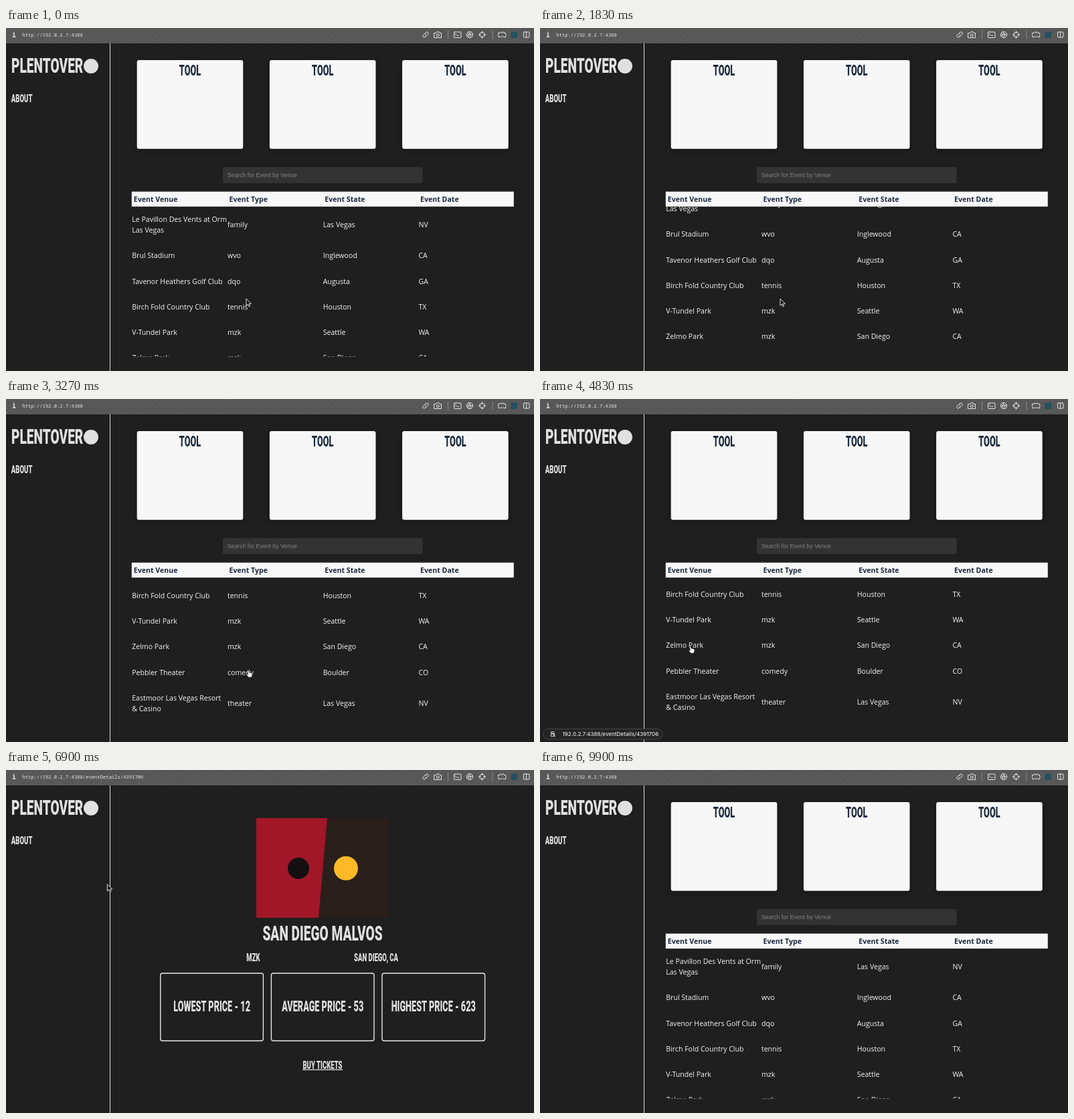
These frames come from a looping animation (789x513 px, 9.93 s). An HTML page:

```html
<!DOCTYPE html>
<html lang="en">
<head>
<meta charset="utf-8">
<title>Event list</title>
<style>
  html, body { margin: 0; width: 100%; height: 100%; overflow: hidden; background: #1f1f1f; }
  svg { display: block; width: 789px; height: 513px; }
  .line { fill: none; stroke: #e6e6e6; stroke-width: 1; stroke-linecap: round; stroke-linejoin: round; }
  .mono { font: 7.2px "Noto Sans Mono", monospace; fill: #e2e2e2; }
  .body { font: 500 10.6px "Open Sans", sans-serif; fill: #f4f4f4; }
  .head { font: 700 10.6px "Open Sans", sans-serif; fill: #1b263b; }
  .hint { font: 8.75px "Liberation Sans", Arial, sans-serif; fill: #828282; }
  .note { font: 500 8px Inter, sans-serif; fill: #e2e2e2; }
  .title { font-family: Roboto, sans-serif; font-weight: 900; fill: #e0e0e0; }
  .card { fill: #f7f7f7; filter: drop-shadow(0 2px 4px rgba(0, 0, 0, .35)); }
</style>
</head>
<body>
<svg viewBox="0 0 789 513">
  <defs>
    <pattern id="hatch" width="6" height="6" patternUnits="userSpaceOnUse" patternTransform="rotate(45)">
      <rect width="6" height="6" fill="#5a5a5a"/>
      <rect width="3" height="6" fill="#565656"/>
    </pattern>
    <clipPath id="listArea"><rect x="180" y="266" width="590" height="225.5"/></clipPath>
  </defs>
  <rect width="789" height="513" fill="#1f1f1f"/>

  <g id="home">
    <g id="cards"></g>
    <rect x="324" y="208" width="298.5" height="24" rx="2" fill="#333"/>
    <text class="hint" x="330.7" y="223">Search for Event by Venue</text>
    <g clip-path="url(#listArea)"><g id="rows" class="body"></g></g>
    <rect x="187.8" y="244.7" width="571" height="22.4" fill="#f8f8f8"/>
    <g id="heads" class="head"></g>
  </g>

  <g id="details">
    <rect x="374" y="72" width="198.5" height="149" fill="#2a1f1b"/>
    <path d="M374 72H480L467 221H374Z" fill="#a11727"/>
    <circle cx="437" cy="147" r="16" fill="#150f11"/>
    <circle cx="508" cy="147" r="18" fill="#fdb927"/>
    <g id="facts"></g>
    <path d="M443 448.3H503" stroke="#e0e0e0" stroke-width="1.2"/>
  </g>

  <g id="side"></g>
  <circle cx="127" cy="57" r="11" fill="#e0e0e0"/>
  <path d="M155.5 23V513" stroke="#dedede"/>

  <rect width="789" height="23" fill="url(#hatch)"/>
  <g class="line">
    <path d="M10.7 8.7H12.2V12.8M10.3 13H14" stroke-width="1.3"/>
    <path d="M12 6.6h.1" stroke-width="1.7"/>
    <path d="M626 8.2l1.6-1.6a2 2 0 0 1 3 3l-1.8 1.8a2 2 0 0 1-2.8 0M628 11.8l-1.6 1.6a2 2 0 0 1-3-3l1.8-1.8a2 2 0 0 1 2.8 0"/>
    <path d="M640 7.5h2.5l1-1.7h3.5l1 1.7h2.5v7h-10.5z"/>
    <circle cx="645.2" cy="10.7" r="1.9"/>
    <path d="M660.5 4V16M727 4V16" stroke="#888"/>
    <rect x="669.5" y="6" width="10.5" height="8.5" rx="1"/>
    <path d="M671.5 8.5l1.5 1.3-1.5 1.3M674.5 11.3h2"/>
    <circle cx="693" cy="10" r="4.6"/>
    <path d="M691 6l4.5 4.5M697.5 9l-6 2M694.5 14l-1.5-7M689 12l4.5-4.5M690 8l2 6" stroke-width=".8"/>
    <circle cx="711.5" cy="10" r="3.8"/>
    <path d="M711.5 4.8v3M711.5 12.2v3M706.3 10h3M713.7 10h3"/>
    <path d="M735.5 7.5h2.500a1.5 1.5 0 0 1 3 0h.500a1.5 1.5 0 0 1 3 0h2v1.500a1.5 1.5 0 0 1 0 2.500v2h-2.500a1.5 1.5 0 0 0-2.500 0h-.500a1.5 1.5 0 0 0-2.500 0h-2.500v-2a1.5 1.5 0 0 1 0-2.500z"/>
    <rect x="773.5" y="6" width="8.5" height="8" rx="1"/>
    <path d="M777.7 6v8"/>
  </g>
  <rect x="754.5" y="5.500" width="9.500" height="9.500" rx="1" fill="#24505f"/>
  <text id="url" class="mono" x="24.3" y="12.6"></text>

  <g id="status">
    <rect id="pill" x="4.5" y="493.5" height="15.5" rx="7.7" fill="#242424" stroke="#474747"/>
    <path class="line" stroke-width=".9" d="M17.5 500.5v-1.5a1.7 1.7 0 0 1 3.4 0v1.5M16.7 500.7h5v3.6h-5zM16 497.5l6.5 7.3"/>
    <text id="link" class="note" x="33.5" y="504"></text>
  </g>

  <g id="cursor">
    <path id="arrow" d="M0 0V10.2L2.4 8 4 11.7 5.7 11 4.1 7.4H7.3Z" fill="#111" stroke="#f4f4f4" stroke-width=".9"/>
    <path id="hand" d="M1.3 1.2Q2.3 0 3.1 1.2L4.3 4.3Q5.3 3.6 6 4.5 7.1 4 7.6 5 8.8 4.7 9 6L8.7 8.8 7.7 11.2H3.5L.3 7.5Q.2 6.1 2.5 7Z" fill="#f6f6f6" stroke="#222" stroke-width=".7"/>
  </g>
</svg>
<script>
const LOOP = 9930, HOST = "192.0.2.7:4388", COLUMN = 142.75, LINE = 15.95;
const $ = id => document.getElementById(id);
const show = (id, on) => $(id).style.display = on ? "" : "none";
const text = (x, y, s) => `<text x="${x}" y="${y}">${s}</text>`;

// Condensed capitals: every heading shares the same narrowing.
const title = (x, y, size, s, fill = "#e0e0e0", anchor = "middle") =>
  `<text class="title" transform="translate(${x} ${y}) scale(.6 1)" font-size="${size}"
    text-anchor="${anchor}" style="fill:${fill}">${s}</text>`;

const events = [
  ["Le Pavillon Des Vents at Orm|Las Vegas", "family", "Las Vegas", "NV"],
  ["Brul Stadium", "wvo", "Inglewood", "CA"],
  ["Tavenor Heathers Golf Club", "dqo", "Augusta", "GA"],
  ["Birch Fold Country Club", "tennis", "Houston", "TX"],
  ["V-Tundel Park", "mzk", "Seattle", "WA"],
  ["Zelmo Park", "mzk", "San Diego", "CA"],
  ["Pebbler Theater", "comedy", "Boulder", "CO"],
  ["Eastmoor Las Vegas Resort|&amp; Casino", "theater", "Las Vegas", "NV"]
];

let rowTop = 267.2;
$("rows").innerHTML = events.map(cells => {
  const height = 22.3 + LINE * cells[0].split("|").length;
  const base = rowTop + height / 2 + 3.9;
  rowTop += height;
  return cells.map((cell, col) => cell.split("|").map((s, i, all) =>
    text(188.2 + col * COLUMN, base + (i - (all.length - 1) / 2) * LINE, s)).join("")).join("");
}).join("");

$("heads").innerHTML = ["Venue", "Type", "State", "Date"]
  .map((s, i) => text(190.8 + i * COLUMN, 260, "Event " + s)).join("");

$("cards").innerHTML = [0, 1, 2].map(i => {
  const x = 195.7 + i * 198.2;
  return `<rect class="card" x="${x}" y="48" width="158.6" height="132.7" rx="3"/>` +
    title(x + 79.3, 70.5, 21.2, "TOOL", "#1b2a3d");
}).join("");

$("facts").innerHTML =
  title(473, 254.5, 31.9, "SAN DIEGO MALVOS") +
  title(369.5, 285.5, 15.9, "MZK") +
  title(553, 285.5, 15.9, "SAN DIEGO, CA") +
  title(473, 446.5, 15.9, "BUY TICKETS") +
  ["LOWEST PRICE - 12", "AVERAGE PRICE - 53", "HIGHEST PRICE - 623"].map((s, i) => {
    const x = 230.8 + i * 165.6;
    return `<rect x="${x}" y="304" width="153.6" height="101" rx="3" fill="none" stroke="#e8e8e8" stroke-width="1.4"/>` +
      title(x + 76.8, 361, 21.2, s);
  }).join("");

$("side").innerHTML = title(8, 67.3, 31.9, "PLENTOVER", "#e0e0e0", "start") +
  title(7.8, 111.3, 15.9, "ABOUT", "#e0e0e0", "start");

// Keys are [time, value, value...]; linear in between.
function along(keys, t) {
  const i = keys.findIndex(k => k[0] > t);
  if (i < 0) return keys[keys.length - 1].slice(1);
  if (!i) return keys[0].slice(1);
  const a = keys[i - 1], b = keys[i], p = (t - a[0]) / (b[0] - a[0]);
  return a.slice(1).map((v, j) => v + (b[j + 1] - v) * p);
}

const scrollKeys = [[1150, 0], [1830, 32], [2530, 72], [3270, 123], [3400, 125]];
const cursorKeys = [
  [3550, 359, 405], [3900, 318, 397], [4250, 245, 377], [4550, 222, 369],
  [6050, 222, 369], [6400, 196, 290], [6900, 151.5, 171], [6980, 140, 154],
  [7300, 106, 83], [7620, 85, 48], [8600, 85, 48], [8950, 100, 22], [9300, 118, -16]
];
const within = (t, from, to) => t >= from && t < to;
const fade = (t, from, to) => Math.max(0, Math.min(1, (t - from) / 120, (to - t) / 200));

function draw(t) {
  const inside = within(t, 4900, 7950);
  const [x, y] = along(cursorKeys, t);
  const detail = HOST + "/eventDetails/";
  show("home", !inside);
  show("details", inside);
  $("url").textContent = "http://" + (inside ? detail + "4391706" : HOST);

  const scroll = t < 4900 ? Math.round(along(scrollKeys, t)[0]) : 0;
  $("rows").setAttribute("transform", `translate(0 ${-scroll})`);

  const link = t > 7000 ? HOST : detail + (y > 383 ? "4402853" : "4391706");
  if ($("link").textContent !== link) {
    $("link").textContent = link;
    $("pill").setAttribute("width", $("link").getComputedTextLength() + 35);
  }
  $("status").style.opacity = t < 7000 ? fade(t, 3450, 5500) : fade(t, 7830, 8900);

  const hand = within(t, 3250, 5050) || within(t, 7480, 8750);
  show("hand", hand);
  show("arrow", !hand);
  $("cursor").setAttribute("transform", `translate(${x} ${y})`);
}

function tick(now) {
  draw(now % LOOP);
  requestAnimationFrame(tick);
}
draw(0);
requestAnimationFrame(tick);
</script>
</body>
</html>
```
